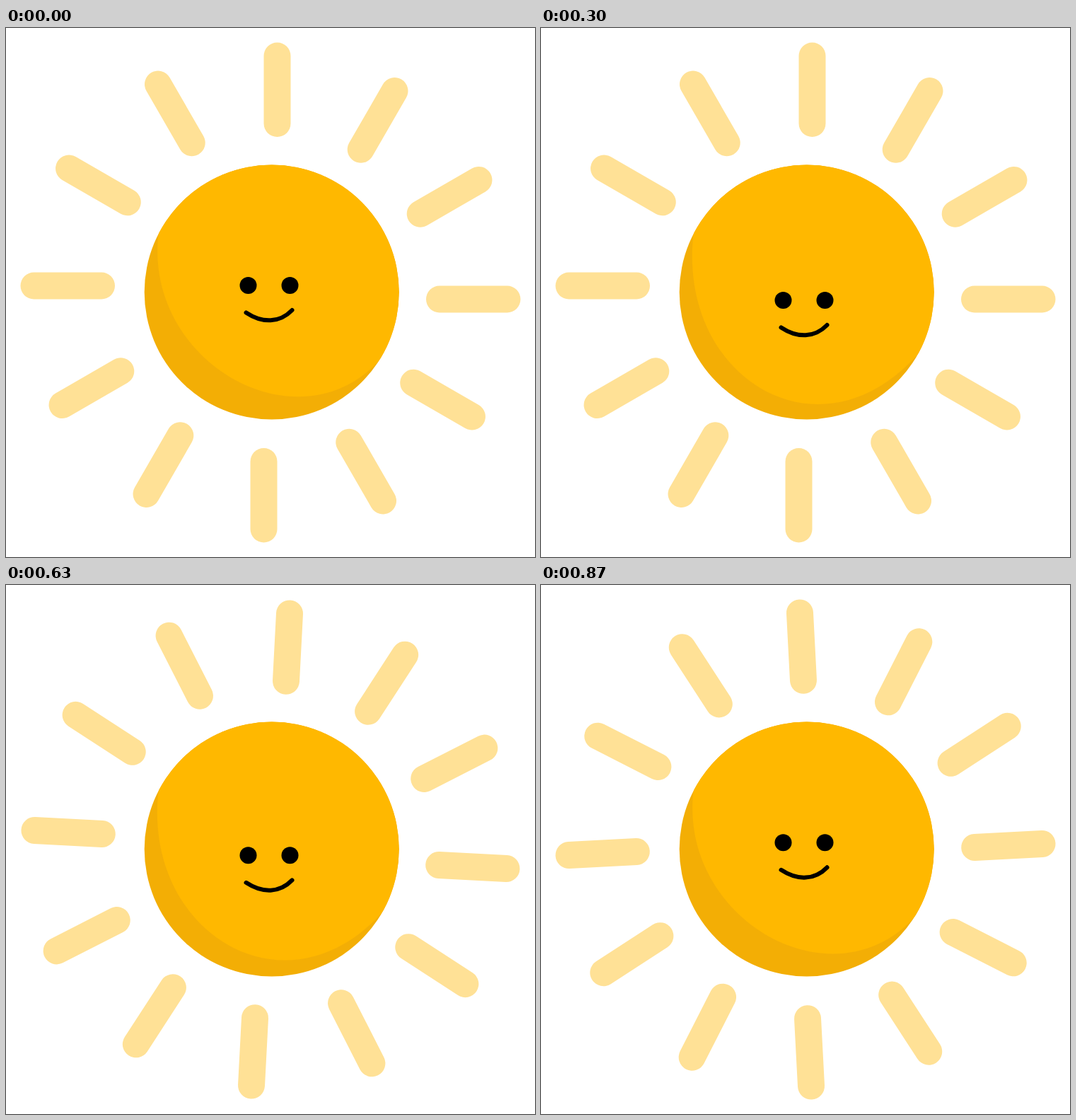
An HTML page for the animation above (0.9 s loop, 748x748 px).

```html
<!DOCTYPE html>
<html lang="en">
<head>
<meta charset="utf-8">
<title>Smiling sun</title>
<style>
  html, body { margin: 0; height: 100%; overflow: hidden; background: #fff; }
  svg { display: block; width: 748px; height: 748px; }
</style>
</head>
<body>
<svg viewBox="0 0 748 748">
  <defs>
    <clipPath id="disc"><circle cx="375.7" cy="373.5" r="180"/></clipPath>
  </defs>
  <g id="rays" stroke="#ffe196" stroke-width="38" stroke-linecap="round"></g>
  <circle cx="375.7" cy="373.5" r="180" fill="#f3ae05"/>
  <path id="light" fill="#ffb800" clip-path="url(#disc)"/>
  <g id="face">
    <circle cx="342.5" cy="364" r="12"/>
    <circle cx="401.5" cy="364" r="12"/>
    <path d="M339.5 402.5C363 418 387 417 404.5 399" fill="none" stroke="#000" stroke-width="6" stroke-linecap="round"/>
  </g>
</svg>
<script>
  const LOOP = 900, STEP = 30;
  const [rays, light, face] = ['rays', 'light', 'face'].map(id => document.getElementById(id));

  rays.innerHTML = Array.from({ length: 12 }, (_, i) =>
    `<path d="M383.5 39.5V135" transform="rotate(${i * 30} 374 374)"/>`).join('');

  const mix = (a, b, k) => a + (b - a) * k;

  // Lower edge of the lit area with the face up and with the face down
  const edgeUp = [192, 470, 411, 597, 528, 470];
  const edgeDown = [190, 500, 386, 626, 535, 458];

  function draw(now) {
    const t = Math.floor(now % LOOP / STEP) * STEP;
    const k = (1 - Math.cos(2 * Math.PI * t / LOOP)) / 2;
    const edge = edgeUp.map((v, i) => mix(v, edgeDown[i], k));
    rays.setAttribute('transform', `rotate(${t / 10} 374 374)`);
    face.setAttribute('transform', `translate(0 ${28 * k})`);
    light.setAttribute('d', `M216 288C${edge.join(' ')}L600 400V100H216Z`);
    requestAnimationFrame(draw);
  }
  draw(performance.now());
</script>
</body>
</html>
```
